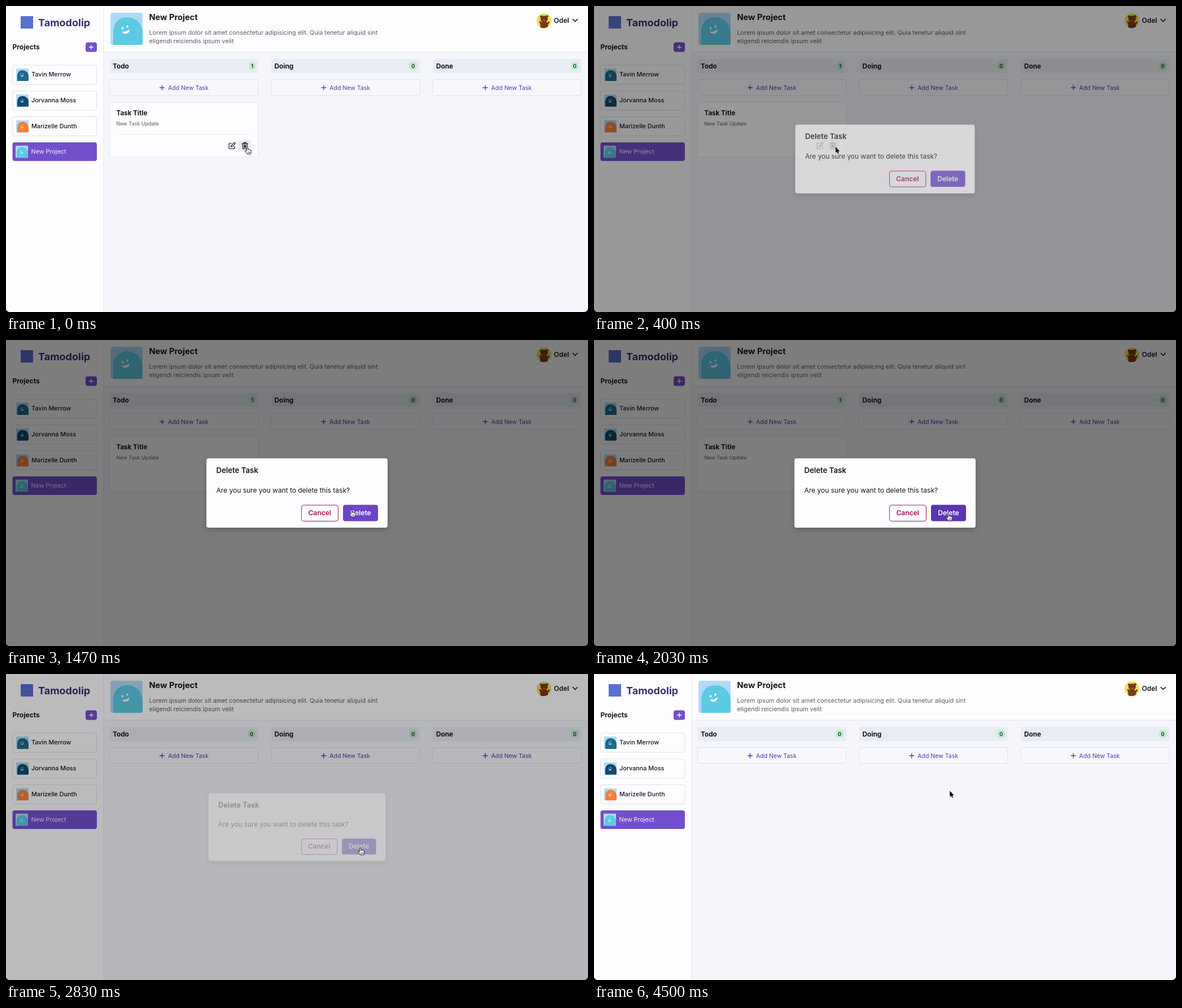
Write an HTML page that moves like this. It is 1031x543 px and loops after 4530 ms.

```html
<!DOCTYPE html>
<html lang="en">
<head>
<meta charset="utf-8">
<title>Task board</title>
<style>
  html, body { margin: 0; width: 100%; height: 100%; overflow: hidden; background: #000; }
  svg.stage {
    display: block; width: 1031px; height: 543px; border-radius: 0 0 7px 7px;
    font-family: Inter, Roboto, sans-serif; fill: #16161d;
  }
  .body { font-size: 10.8px; }
  .muted { fill: #5c5c66; }
  .bold { font-weight: 700; }
  .mid { text-anchor: middle; }
  .line { fill: none; stroke-linecap: round; stroke-linejoin: round; }
  .panel { fill: #fdfcfe; }
  .box { fill: #fdfcfe; stroke: #dfe2ee; }
  .violet { fill: #744fcd; }
  .count { font-size: 9.2px; font-weight: 600; text-anchor: middle; fill: #16331f; }
  .badge { fill: #bdebc9; }

  .anim, .anim * { animation-duration: 4530ms; animation-iteration-count: infinite; animation-timing-function: linear; }
  .step { animation-timing-function: step-end !important; }
  .before { animation-name: before; }
  .after { animation-name: after; }
  .fade { animation-name: fade; }
  .zoom { animation-name: zoom; transform-origin: 515.5px 271.5px; }
  .hover { animation-name: hover; }
  .hand { animation-name: hand; }
  .arrow { animation-name: arrow; }
  .move-x { animation-name: move-x; }
  .move-y { animation-name: move-y; }

  /* the task is deleted at 2700 ms */
  @keyframes before { 0% { opacity: 1 } 59.603%, 100% { opacity: 0 } }
  @keyframes after { 0% { opacity: 0 } 59.603%, 100% { opacity: 1 } }

  /* dialog: opens 265–565 ms, closes 2705–2905 ms */
  @keyframes fade {
    0% { opacity: 0 }
    5.85% { opacity: 0; animation-timing-function: cubic-bezier(0, 0, .2, 1) }
    12.472% { opacity: 1 }
    59.713% { opacity: 1; animation-timing-function: cubic-bezier(.4, 0, 1, 1) }
    64.128%, 100% { opacity: 0 }
  }
  @keyframes zoom {
    0% { transform: scale(.95) }
    5.85% { transform: scale(.95); animation-timing-function: cubic-bezier(0, 0, .2, 1) }
    12.472% { transform: scale(1) }
    59.713% { transform: scale(1); animation-timing-function: cubic-bezier(.4, 0, 1, 1) }
    64.128%, 100% { transform: scale(.95) }
  }
  @keyframes hover {
    0%, 31.567% { fill: #744fcd }
    34.2%, 100% { fill: #5c35b3 }
  }

  /* pointer: 750–1650 ms to the button, 3970–4510 ms upwards */
  @keyframes hand {
    0% { opacity: 1 } 5.85% { opacity: 0 } 31.567% { opacity: 1 } 64.128%, 100% { opacity: 0 }
  }
  @keyframes arrow {
    0% { opacity: 0 } 5.85% { opacity: 1 } 31.567% { opacity: 0 } 64.128%, 100% { opacity: 1 }
  }
  @keyframes move-x {
    0% { transform: translateX(428px) }
    16.556% { transform: translateX(428px); animation-timing-function: cubic-bezier(.36, 0, .58, 1) }
    36.424% { transform: translateX(628.5px) }
    87.638% { transform: translateX(628.5px); animation-timing-function: ease-in-out }
    99.558%, 100% { transform: translateX(630.3px) }
  }
  @keyframes move-y {
    0% { transform: translateY(250px) }
    16.556% { transform: translateY(250px); animation-timing-function: cubic-bezier(.7, 0, .6, 1) }
    36.424% { transform: translateY(308px) }
    87.638% { transform: translateY(308px); animation-timing-function: ease-in-out }
    99.558%, 100% { transform: translateY(207.3px) }
  }
</style>
</head>
<body>
<svg class="stage" viewBox="0 0 1031 543">
  <defs>
    <filter id="shadow" x="-10%" y="-20%" width="120%" height="150%">
      <feDropShadow dx="0" dy="4" stdDeviation="5" flood-opacity=".18"/>
    </filter>
    <symbol id="buddy" viewBox="0 0 57 57">
      <rect width="57" height="57" rx="4" fill="#b0daf6"/>
      <path d="M5 57V38C4 19 14 8 29 8C47 8 57 21 57 37V54Q57 57 54 57Z" fill="currentColor"/>
      <g fill="#fff">
        <ellipse cx="21.5" cy="27.5" rx="1.7" ry="2.2"/>
        <ellipse cx="30" cy="24.5" rx="1.7" ry="2.2"/>
        <path d="M20 33.5Q27.500 34.500 33.500 29.500Q34.500 35.500 28.500 37Q22.500 38 20 33.500Z"/>
      </g>
    </symbol>
    <g id="column">
      <rect x="183.500" y="94" width="263.500" height="25" rx="3" fill="#e9ecf3"/>
      <rect class="box" style="fill:#f8f8fc" x="183.500" y="130.500" width="263" height="28" rx="3"/>
      <path class="line" d="M272.500 145h8M276.500 141v8" stroke="#5936ae" stroke-width="1.300"/>
      <text x="287" y="148.500" font-size="10.500" fill="#5936ae">Add New Task</text>
    </g>
    <g id="zero">
      <rect class="badge" x="428.700" y="99.500" width="12.600" height="13.500" rx="4"/>
      <text class="count" x="435" y="109.500">0</text>
    </g>
  </defs>

  <rect width="1031" height="543" fill="#f5f6fb"/>
  <rect class="panel" width="173" height="543"/>
  <rect class="panel" x="173" width="858" height="82"/>
  <path d="M173 0V543M173 82H1031" stroke="#e3e5ee" fill="none"/>

  <!-- sidebar -->
  <rect x="26" y="18" width="22" height="22" fill="#5a6fd0"/>
  <text class="bold" x="57" y="36" font-size="18" fill="#3a2f6e">Tamodolip</text>
  <text class="bold" x="11.500" y="77.300" font-size="12">Projects</text>
  <rect class="violet" x="141" y="64.500" width="20" height="17" rx="4"/>
  <path class="line" d="M147.500 73h7M151 69.500v7" stroke="#fff" stroke-width="1.300"/>

  <g class="body" font-weight="500">
    <rect class="box" x="11.500" y="105" width="149.500" height="34" rx="4"/>
    <rect class="box" x="11.500" y="150.800" width="149.500" height="34" rx="4"/>
    <rect class="box" x="11.500" y="196.500" width="149.500" height="34" rx="4"/>
    <rect class="violet" x="11.500" y="242" width="149.500" height="33" rx="4"/>
    <use href="#buddy" x="18" y="111" width="22" height="22" color="#1c6a8e"/>
    <use href="#buddy" x="18" y="156.700" width="22" height="22" color="#114a70"/>
    <use href="#buddy" x="18" y="202.500" width="22" height="22" color="#f57f3e"/>
    <use href="#buddy" x="17" y="247.500" width="22" height="22" color="#5ccae3"/>
    <text x="45" y="125.300">Tavin Merrow</text>
    <text x="45" y="171">Jorvanna Moss</text>
    <text x="45" y="216.800">Marizelle Dunth</text>
    <text x="44.500" y="262.200" font-weight="400" fill="#f4f0ff">New Project</text>
  </g>

  <!-- header -->
  <use href="#buddy" x="185" y="12" width="57" height="57" color="#5ccae3"/>
  <text class="bold" x="253.500" y="25.300" font-size="14.600">New Project</text>
  <g class="body muted">
    <text x="253.500" y="51.300">Lorem ipsum dolor sit amet consectetur adipisicing elit. Quia tenetur aliquid sint</text>
    <text x="253.500" y="66.300">eligendi reiciendis ipsum velit</text>
  </g>
  <circle cx="953" cy="26" r="13" fill="#ede25c"/>
  <g fill="#7c3b14">
    <circle cx="948" cy="19" r="2.300"/>
    <circle cx="958.500" cy="18.500" r="2.300"/>
    <ellipse cx="953.300" cy="23" rx="6.500" ry="6"/>
    <path d="M946.500 38Q945 27 953 27Q961.500 27 960 37Q953 41 946.500 38Z"/>
    <path class="line" d="M948 32l-2-4M959 32l2.500-3" stroke="#7c3b14" stroke-width="3"/>
    <ellipse cx="953.500" cy="25" rx="2.600" ry="2" fill="#a9602c"/>
    <g fill="#2c1206">
      <circle cx="950.500" cy="22" r=".8"/>
      <circle cx="956.500" cy="22" r=".8"/>
      <circle cx="953.500" cy="24.300" r=".9"/>
    </g>
  </g>
  <text x="970.500" y="30" font-size="12" font-weight="600">Odel</text>
  <path class="line" d="M1004.300 23.500l4 4 4-4" stroke="#16161d" stroke-width="1.700"/>

  <!-- board -->
  <use href="#column"/>
  <use href="#column" x="286.300"/>
  <use href="#column" x="572.600"/>
  <use href="#zero" x="286.300"/>
  <use href="#zero" x="572.600"/>
  <g class="bold" font-size="11.800">
    <text x="189" y="110.500">Todo</text>
    <text x="475.500" y="110.500">Doing</text>
    <text x="762" y="110.500">Done</text>
  </g>

  <g class="anim">
    <g class="after step"><use href="#zero"/></g>
    <g class="before step">
      <rect class="badge" x="431.200" y="99.500" width="10.300" height="13.500" rx="4"/>
      <text class="count" x="436.300" y="109.500">1</text>
      <rect class="box" style="stroke:#e4e6ef" x="183.500" y="171" width="263" height="97" rx="4"/>
      <text class="bold" x="195.500" y="193.500" font-size="11.600">Task Title</text>
      <text class="muted" x="195.500" y="212" font-size="9">New Task Update</text>
      <path d="M196 227.500H435" stroke="#ecedf3"/>
      <rect x="411.500" y="238" width="23" height="20" rx="4" fill="#e8eaf2"/>
      <g class="line" stroke="#16161d" stroke-width="1.200">
        <path d="M399.500 243.500h-3.200q-1.300 0-1.300 1.300v7.400q0 1.300 1.300 1.300h7.400q1.300 0 1.300-1.300v-3.200"/>
        <path d="M398.500 250.200l.4-2.400 5.300-5.300q1-.6 1.700.1t.1 1.700l-5.200 5.300z"/>
        <path d="M418 244.300h10.200M421 244v-1.700h4.200v1.700M419 244.500l.5 9h7.200l.5-9M421.700 246.700v4.500M423.100 246.700v4.500M424.500 246.700v4.500"/>
      </g>
    </g>

    <!-- dialog -->
    <rect class="fade" width="1031" height="543" fill="#000" fill-opacity=".5"/>
    <g class="fade">
      <g class="fade">
        <g class="zoom">
          <rect x="355" y="210" width="321" height="123" rx="4" fill="#fdfcfe" filter="url(#shadow)"/>
          <text x="372.500" y="235.700" font-size="13.200" font-weight="600">Delete Task</text>
          <text x="372.500" y="271" font-size="12">Are you sure you want to delete this task?</text>
          <rect x="523.500" y="293" width="65" height="28.500" rx="4" fill="#fdfcfe" stroke="#a3195b"/>
          <rect class="hover" x="597" y="292.500" width="62" height="29" rx="4" fill="#744fcd"/>
          <g class="mid" font-size="12.100" font-weight="600">
            <text x="555.700" y="311.300" fill="#a3195b">Cancel</text>
            <text x="628" y="311.300" fill="#fff">Delete</text>
          </g>
        </g>
      </g>
    </g>

    <!-- pointer -->
    <g class="move-x"><g class="move-y">
      <path class="arrow step" d="M0 0V10.800L2.400 8.600L4 12.300L5.900 11.500L4.300 7.900H7.500Z"
        fill="#000" stroke="#fff" stroke-width=".8" paint-order="stroke"/>
      <g class="hand step" fill="#fff" stroke="#000" stroke-width=".9" stroke-linejoin="round">
        <path d="M-1.800 1.400Q-1.800 0 -.7 0T.5 1.400V4.600Q2.200 3.800 2.700 5Q4.300 4.400 4.700 5.700Q6.300 5.500 6.300 7.100V9Q6.300 10.600 5.200 12.800H-.8Q-1.800 10.700-4.400 8.200Q-5 7-3.900 6.600Q-3 6.500-1.800 7.700Z"/>
        <path d="M.6 8.500v2.500M2.400 8.500v2.500M4.200 8.500v2.500" stroke-width=".7"/>
      </g>
    </g></g>
  </g>
</svg>
</body>
</html>
```
